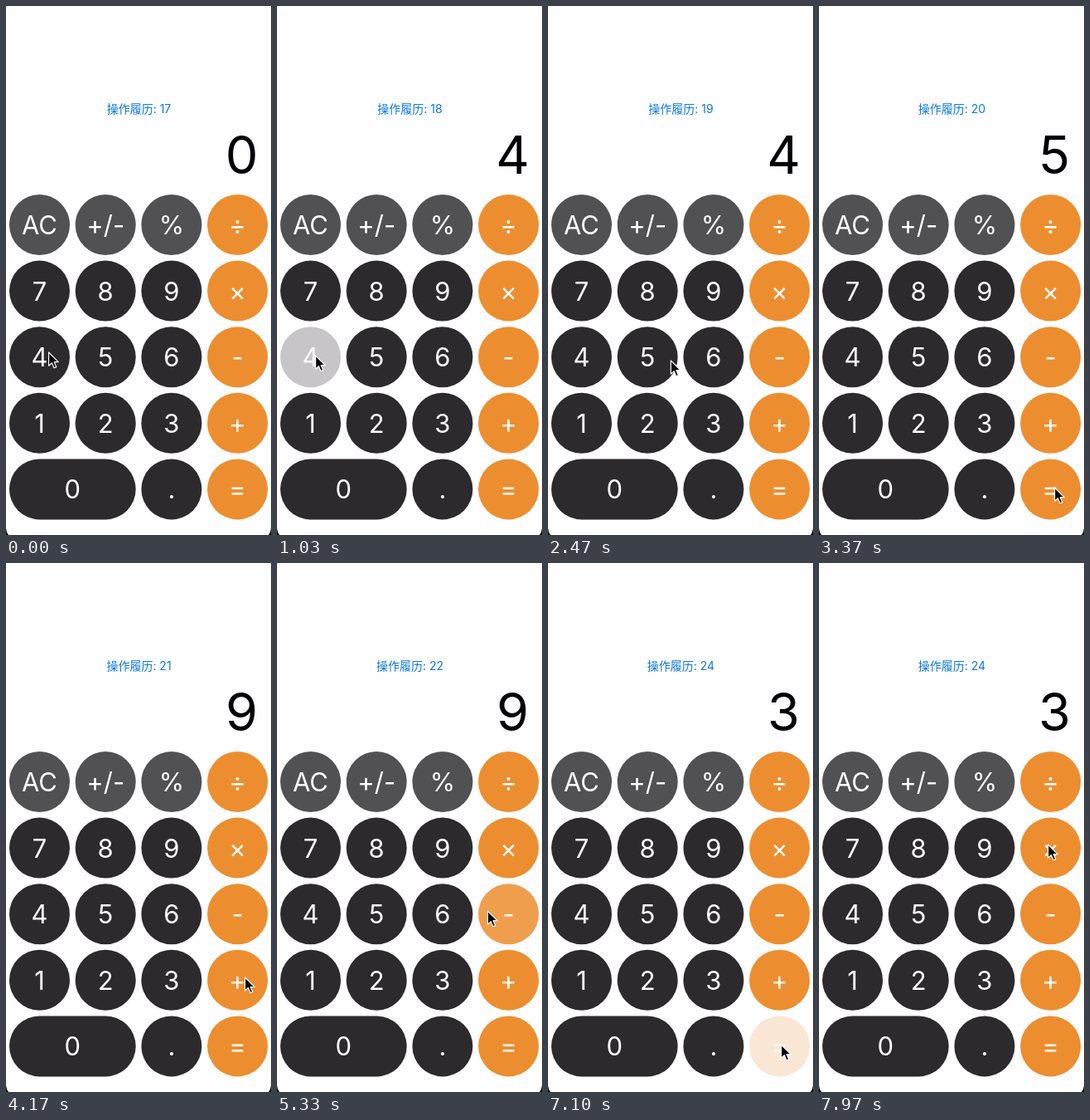
Animation of 320 by 637 pixels, one loop 8000 ms. Source, as an HTML page:

```html
<!DOCTYPE html>
<html lang="zh">
<head>
<meta charset="utf-8">
<title>Calculator</title>
<style>
  html, body { margin: 0; width: 100%; height: 100%; overflow: hidden; background: #fefdff; }
  svg { display: block; width: 100%; height: 100%; }
  text { text-anchor: middle; font-family: Inter, "Noto Sans CJK SC", "Noto Sans CJK", sans-serif; font-feature-settings: "calt" 0; }
  #keys text { fill: #fff; font-size: 31px; }
  #history { fill: #0b79e3; font-size: 14px; }
  #display { font-size: 63px; }
</style>
</head>
<body>
<svg viewBox="0 0 320 637">
  <rect width="320" height="637" fill="#fefdff"/>
  <text id="history" x="160.5" y="128.5"></text>
  <text id="display" x="284.5" y="202"></text>
  <g id="keys"></g>
  <path d="M0 629Q.5 634 3 637H0ZM320 629Q319.5 634 317 637H320Z"/>
  <path id="cursor" d="M.6 1V17.2L4.4 13.7L7 19.8L9.8 18.6L7.2 12.7H12.2Z" stroke="#fff" stroke-width="1.2" stroke-linejoin="round"/>
</svg>
<script>
const LOOP = 8000, DIM = 0.2, FADE = 350;
const ROWS = ["AC +/- % ÷", "7 8 9 ×", "4 5 6 -", "1 2 3 +", "0 0 . ="];

// key, press time, release time, display after release
const PRESSES = [
  ["4", 880, 970, "4"],
  ["+", 1930, 2020, "4"],
  ["5", 2660, 2750, "5"],
  ["=", 3510, 3600, "9"],
  ["-", 4990, 5080, "9"],
  ["6", 6100, 6200, "6"],
  ["=", 7010, 7100, "3"],
];

// time, x, y of the pointer tip
const PATH = [
  [0, 51, 416], [600, 46, 420], [1050, 46, 420], [1670, 288, 447],
  [1850, 287, 497], [2120, 287, 497], [2470, 148, 426], [2600, 127, 424],
  [2850, 127, 424], [3320, 284, 579], [3750, 284, 579], [4170, 288, 498],
  [4500, 283, 425], [5130, 280, 420], [5330, 254, 418], [5650, 203, 425],
  [6300, 201, 425], [6400, 201, 425], [6680, 281, 579], [7300, 281, 579],
  [7800, 277, 344], [7970, 276, 338], [8000, 276, 338],
];

const $ = id => document.getElementById(id);
const keys = {};

function add(parent, tag, attrs) {
  const node = document.createElementNS(parent.namespaceURI, tag);
  for (const name in attrs) node.setAttribute(name, attrs[name]);
  return parent.appendChild(node);
}

function keyColor(row, col) {
  if (col === 3) return "#ec8e2f";
  return row ? "#2c2a2d" : "#515053";
}

ROWS.forEach((line, row) => line.split(" ").forEach((label, col) => {
  if (keys[label]) return;
  const wide = label === "0";
  const x = 4 + col * 79.7, y = 227 + row * 79.6, width = wide ? 152.7 : 73;
  const key = keys[label] = add($("keys"), "g", {});
  add(key, "rect", { x, y, width, height: 73, rx: 36.5, fill: keyColor(row, col) });
  add(key, "text", { x: x + width / 2, y: y + 48 }).textContent = label;
}));

// Monotone cubic slope: zero at rests and turning points.
function slope(i, axis) {
  if (i === 0 || i === PATH.length - 1) return 0;
  const rate = k => (PATH[k + 1][axis] - PATH[k][axis]) / (PATH[k + 1][0] - PATH[k][0]);
  const before = rate(i - 1), after = rate(i);
  return before * after > 0 ? 2 * before * after / (before + after) : 0;
}

function pointer(t, axis) {
  let i = 0;
  while (i < PATH.length - 2 && t >= PATH[i + 1][0]) i++;
  const a = PATH[i], b = PATH[i + 1], span = b[0] - a[0], u = (t - a[0]) / span;
  const ease = u * u * (3 - 2 * u);
  return a[axis] + (b[axis] - a[axis]) * ease
    + span * u * (1 - u) * ((1 - u) * slope(i, axis) - u * slope(i + 1, axis));
}

function keyOpacity(t, press, release) {
  if (t < press || t > release + FADE) return 1;
  if (t < release) return DIM;
  return DIM + (1 - DIM) * (1 - Math.cos(Math.PI * (t - release) / FADE)) / 2;
}

function render(t) {
  const opacity = {};
  let count = 17, shown = "0";
  for (const [label, press, release, result] of PRESSES) {
    opacity[label] = Math.min(opacity[label] ?? 1, keyOpacity(t, press, release));
    if (t >= release) {
      count++;
      shown = result;
    }
  }
  for (const label in opacity) keys[label].setAttribute("opacity", opacity[label]);
  $("history").textContent = "操作履历: " + count;
  $("display").textContent = shown;
  $("cursor").setAttribute("transform", `translate(${pointer(t, 1)} ${pointer(t, 2)})`);
}

const start = performance.now();
function tick(now) {
  render(Math.max(0, now - start) % LOOP);
  requestAnimationFrame(tick);
}
render(0);
requestAnimationFrame(tick);
</script>
</body>
</html>
```
